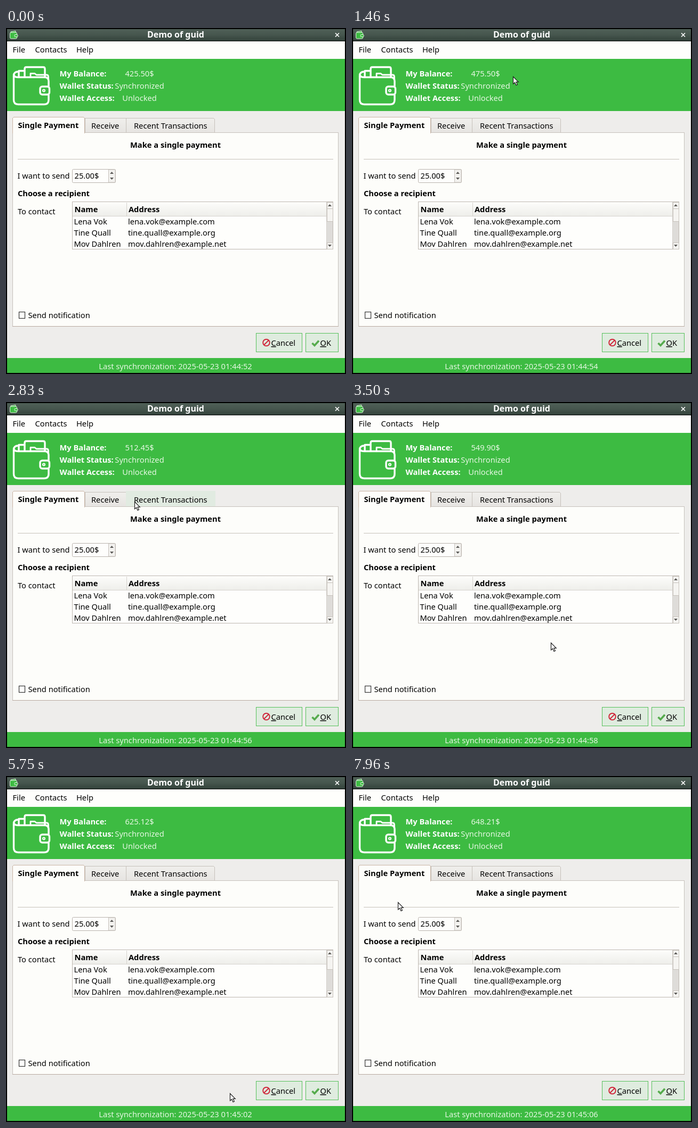
Recreate the animation shown at these times as an HTML page. Size 638 by 650 pixels, loop 8000 ms.

```html
<!DOCTYPE html>
<html lang="en">
<head>
<meta charset="utf-8">
<title>Demo of guid</title>
<style>
  html, body { margin: 0; width: 100%; height: 100%; overflow: hidden; background: #000; }
  svg { display: block; width: 100vw; height: 100vh; }
  text { font: 14.667px "Noto Sans", sans-serif; fill: #000; white-space: pre; }
  .b { font-weight: 700; }
  .w text, text.w { fill: #fff; }
  .mid { text-anchor: middle; }
  .soft text, text.soft { fill: #e6f8e3; }
  .title { font-size: 16px; }
  .u { text-decoration: underline; }
  .crisp { shape-rendering: crispEdges; }
  .line { fill: none; stroke: #c6c1bb; }
  .hover { fill: #e1ebe1; visibility: hidden; }
</style>
</head>
<body>
<svg viewBox="0 0 638 650">
  <defs>
    <linearGradient id="bar" x2="0" y2="1">
      <stop stop-color="#55665d"/><stop offset=".5" stop-color="#4a5a52"/><stop offset="1" stop-color="#35443d"/>
    </linearGradient>
    <linearGradient id="tab" x2="0" y2="1">
      <stop stop-color="#f0efec"/><stop offset="1" stop-color="#e6e4e1"/>
    </linearGradient>
    <linearGradient id="head" x2="0" y2="1">
      <stop stop-color="#fdfdfb"/><stop offset="1" stop-color="#eeeeea"/>
    </linearGradient>
    <pattern id="stripes" width="4" height="2" patternUnits="userSpaceOnUse">
      <path d="M0 .5H4" stroke="#24322b" stroke-opacity=".22"/>
    </pattern>
  </defs>

  <!-- window frame -->
  <g class="crisp">
    <rect width="638" height="650"/>
    <rect x="2" y="2" width="634" height="22" fill="url(#bar)"/>
    <rect x="2" y="2" width="634" height="22" fill="url(#stripes)"/>
    <rect x="2" y="25" width="634" height="33" fill="#fefefc"/>
    <rect x="2" y="58" width="634" height="98" fill="#3dbb42"/>
    <rect x="2" y="156" width="634" height="464" fill="#eeedeb"/>
    <rect x="2" y="620" width="634" height="28" fill="#3dbb42"/>
  </g>
  <g fill="#3dbb42" stroke="#e2f3e1">
    <path d="M9 9V7L18 5.500V9"/>
    <rect x="7.500" y="8.500" width="13" height="11.500" rx="2"/>
    <rect x="16" y="12.500" width="6" height="4" rx="1"/>
  </g>
  <text class="b w mid title" x="318.500" y="18">Demo of guid</text>
  <path d="M618 9.500l7 7m0-7l-7 7" stroke="#fff" stroke-width="1.700"/>
  <text x="12.500" y="46">File</text>
  <text x="54.500" y="46">Contacts</text>
  <text x="132" y="46">Help</text>

  <!-- wallet summary -->
  <g fill="none" stroke="#fff" stroke-width="3.400" stroke-linejoin="round" stroke-linecap="round">
    <path d="M23 82Q14.500 82 14.500 90V135Q14.500 143.500 23 143.500H72Q80 143.500 80 135V126M80 109V100Q80 92.500 72 92.500H22Q15 92.500 14.500 87"/>
    <path d="M24 91V80.500H35M35 91V77Q35 73.500 38 73.500H70Q73 73.500 73 77V91"/>
    <path d="M46 91V85.500H54L57 88H76Q79.500 88 79.500 92V96" stroke-width="2.800"/>
    <rect x="64" y="110" width="17.500" height="15" rx="4"/>
    <circle cx="71" cy="117.500" r="2" stroke-width="2"/>
  </g>
  <g class="w">
    <text class="b" x="100.500" y="91">My Balance:</text>
    <text class="b" x="100.500" y="114">Wallet Status:</text>
    <text class="b" x="100.500" y="137">Wallet Access:</text>
  </g>
  <g class="soft mid">
    <text id="balance" x="250.500" y="91"></text>
    <text x="250.500" y="114">Synchronized</text>
    <text x="250.500" y="137">Unlocked</text>
  </g>

  <!-- tabs -->
  <g class="crisp">
    <path d="M148.500 197V169.500H389.500L391.500 171.500V197" fill="url(#tab)" stroke="#c6c1bb"/>
    <path class="line" d="M225.500 169V197"/>
    <rect class="hover" x="148" y="167" width="77" height="30"/>
    <rect class="hover" x="225" y="167" width="168" height="30"/>
    <rect x="12.500" y="196.500" width="611" height="364" fill="#fdfdfa" stroke="#c6c1bb"/>
    <path d="M12.500 198V169.500L14.500 167.500H145.500L147.500 169.500V198" fill="#fdfdfa" stroke="#c9b5a5"/>
    <path d="M13 198H147" stroke="#fdfdfa" stroke-width="3"/>
    <path class="line" d="M12 560.500H624" style="stroke:#b8aaa0"/>
  </g>
  <text class="b" x="22.500" y="188">Single Payment</text>
  <text x="160" y="189">Receive</text>
  <text x="240" y="189">Recent Transactions</text>

  <!-- payment form -->
  <text class="b mid" x="318" y="225">Make a single payment</text>
  <path class="line crisp" d="M22 246.500H614"/>
  <text x="21.500" y="283">I want to send</text>
  <rect x="124.500" y="265.500" width="81" height="25" rx="2" fill="#fefefc" stroke="#b9b3ad"/>
  <path d="M192.500 266V290H205V266Z" fill="#f3f2ef" stroke="#c6c1bb"/>
  <path d="M195 274l3.500-4 3.500 4zM195 281l3.500 4 3.500-4z" fill="#5a5956"/>
  <text x="128.500" y="283">25.00$</text>
  <text class="b" x="22" y="316">Choose a recipient</text>
  <text x="22" y="350">To contact</text>

  <g class="crisp">
    <rect x="124.500" y="326.500" width="489" height="89" fill="#fefefc" stroke="#bdb7b1"/>
    <rect x="125" y="327" width="476" height="26" fill="url(#head)"/>
    <path class="line" d="M125 353.500H601M226.500 328V353M601.500 327V415" style="stroke:#d5d2cd"/>
    <rect x="602" y="327" width="11" height="88" fill="#dedcd9"/>
    <path d="M602 327h11v12h-11zM602 339h11v24h-11zM602 403h11v12h-11z" fill="#f5f4f1" stroke="#c6c1bb"/>
  </g>
  <path d="M604 335l3.500-4 3.500 4zM604 407l3.500 4 3.500-4z" fill="#5a5956"/>
  <text class="b" x="128.500" y="346">Name</text>
  <text class="b" x="230" y="346">Address</text>
  <g id="contacts"></g>

  <rect x="24.500" y="533.500" width="11" height="12" fill="#fefefc" stroke="#333" stroke-width="1.200"/>
  <text x="41.500" y="545">Send notification</text>

  <!-- buttons -->
  <g class="crisp" stroke="#55c05a">
    <rect x="469.500" y="573.500" width="86" height="35" fill="#dfecdf"/>
    <rect x="562.500" y="573.500" width="61" height="35" fill="#dfecdf"/>
    <rect class="hover" x="469.500" y="573.500" width="86" height="35" style="fill:#edf6ed"/>
    <rect class="hover" x="562.500" y="573.500" width="61" height="35" style="fill:#edf6ed"/>
  </g>
  <g fill="none" stroke="#d0283c" stroke-width="2">
    <circle cx="488.500" cy="591" r="6.300"/><path d="M484 595.500l9-9"/>
  </g>
  <path d="M574.500 592l4.500 4.500 8-9" fill="none" stroke="#55ab4c" stroke-width="3.600"/>
  <text x="497.500" y="597"><tspan class="u">C</tspan>ancel</text>
  <text x="589.500" y="597"><tspan class="u">O</tspan>K</text>

  <text id="sync" class="soft mid" x="318" y="640.500"></text>
  <path id="cursor" d="M.5 .5V14L3.600 11.200 6 16.500 8.400 15.400 6 10.400H10.200Z" fill="#fff" stroke="#1c1c1c" stroke-width="1.200"/>
</svg>
<script>
const LOOP = 8000, FIRST_TICK = 610, TICK = 1200, CURSOR_ENTERS = 880;
const byId = id => document.getElementById(id);

const contacts = [
  ["Lena Vok", "lena.vok@example.com"],
  ["Tine Quall", "tine.quall@example.org"],
  ["Mov Dahlren", "mov.dahlren@example.net"],
];
byId("contacts").innerHTML = contacts.map(([name, address], i) => {
  const y = 369 + 21 * i;
  return `<text x="127.500" y="${y}">${name}</text><text x="229" y="${y}">${address}</text>`;
}).join("");

const balances = ["425.50", "475.50", "512.45", "549.90", "587.23", "625.12", "637.50", "648.21"];

// Pointer stops: time, x, y
const stops = [
  [880, 632, 600], [980, 590, 588], [1400, 302, 91], [1480, 302, 91],
  [1690, 146, 50], [2000, 90, 70], [2500, 57, 182], [2800, 241, 187],
  [2860, 241, 187], [3400, 370, 440], [4050, 420, 626], [4500, 420, 626],
  [4900, 420, 596], [5900, 420, 596], [6400, 195, 506], [6500, 195, 506],
  [7250, 66, 270], [7800, 86, 237], [8000, 86, 237],
];

function pointerAt(t) {
  const i = Math.max(1, stops.findIndex(s => s[0] >= t));
  const [t0, x0, y0] = stops[i - 1], [t1, x1, y1] = stops[i];
  const p = Math.min(1, Math.max(0, (t - t0) / (t1 - t0)));
  const e = p * p * (3 - 2 * p);
  return [x0 + (x1 - x0) * e, y0 + (y1 - y0) * e];
}

const hovers = [...document.querySelectorAll(".hover")].map(el => ({
  el, box: ["x", "y", "width", "height"].map(name => +el.getAttribute(name)),
}));
const show = (el, visible) => { el.style.visibility = visible ? "visible" : "hidden"; };

function render(t) {
  const ticks = Math.max(0, Math.floor((t - FIRST_TICK) / TICK) + 1);
  const seconds = 52 + 2 * ticks;
  const clock = `01:${44 + Math.floor(seconds / 60)}:${String(seconds % 60).padStart(2, "0")}`;
  byId("balance").textContent = balances[ticks] + "$";
  byId("sync").textContent = `Last synchronization: 2025-05-23 ${clock}`;

  const active = t >= CURSOR_ENTERS, [x, y] = pointerAt(t);
  show(byId("cursor"), active);
  byId("cursor").setAttribute("transform", `translate(${Math.round(x)} ${Math.round(y)})`);
  for (const { el, box: [bx, by, w, h] } of hovers)
    show(el, active && x >= bx && x < bx + w && y >= by && y < by + h);
}

const start = performance.now();
function frame() {
  render((performance.now() - start) % LOOP);
  requestAnimationFrame(frame);
}
frame();
</script>
</body>
</html>
```
